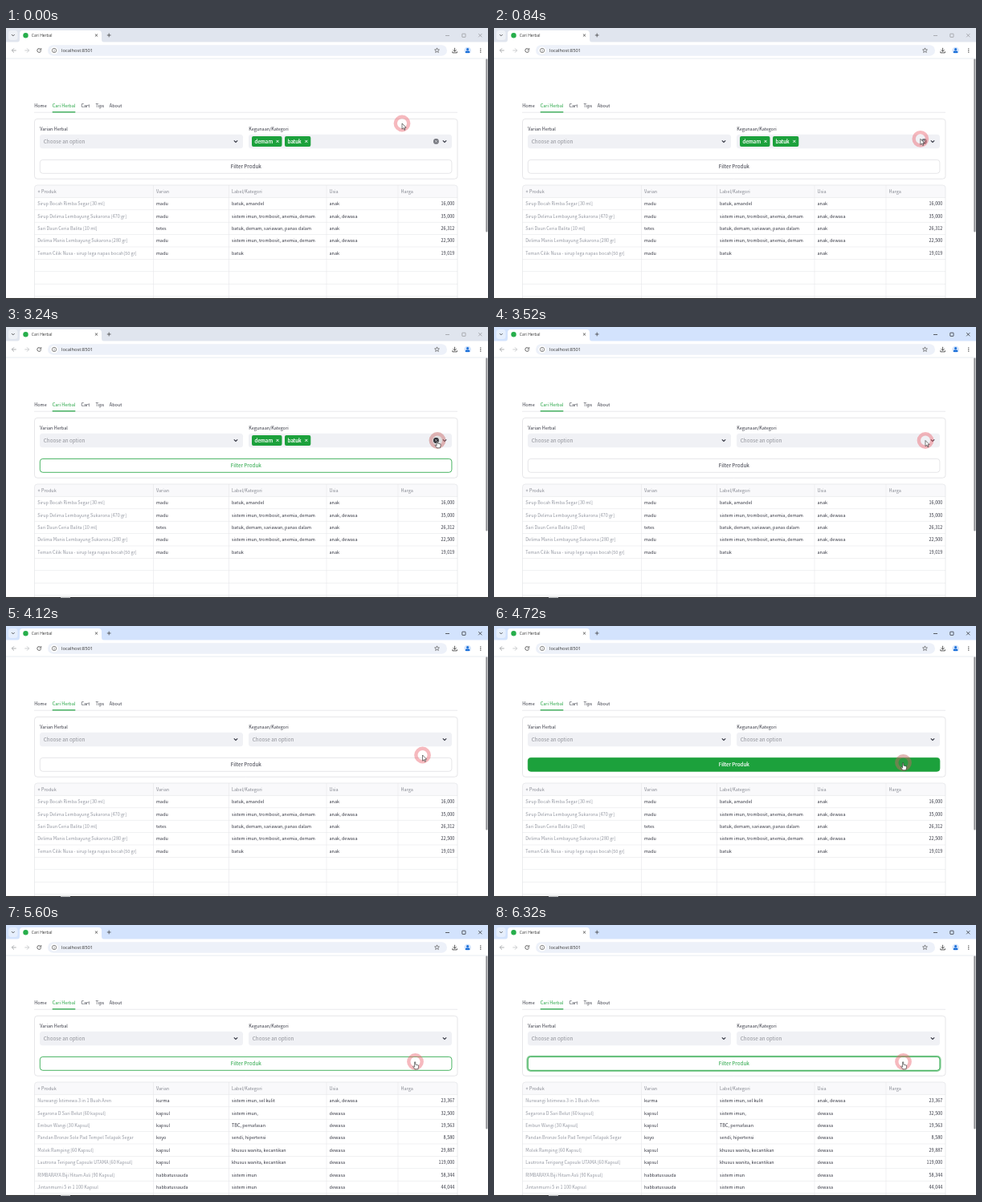
These frames come from a looping animation (600 by 338 pixels, 6.36 s). An HTML page with a canvas:

```html
<!DOCTYPE html>
<html lang="id">
<head>
<meta charset="utf-8">
<title>Cari Herbal</title>
<style>
html, body { margin: 0; width: 100%; height: 100%; overflow: hidden; background: #fff; }
canvas { display: block; width: 600px; height: 338px; }
</style>
</head>
<body>
<canvas id="stage"></canvas>
<script>
const LOOP = 6360;
const canvas = document.getElementById('stage');
const ctx = canvas.getContext('2d');
const dpr = window.devicePixelRatio || 1;
canvas.width = 600 * dpr;
canvas.height = 338 * dpr;

const SANS = '"Noto Sans CJK JP", "Noto Sans CJK SC", "Noto Sans CJK", "Noto Sans", sans-serif';
const UI = '"Open Sans", "Noto Sans", sans-serif';
const GREEN = '#1ca13c', INK = '#31333f', MUTED = '#9296a0', LINE = '#e6e7ea', EDGE = '#d6d6d9';
const SMALL = 5.5, LARGE = 6.3;

// Event times in ms
const T = {
  tipOn: 1800, tipOff: 3060, press: 3160, release: 3360, focus: 3280, clear: 3400, blur: 3440,
  press2: 4640, release2: 4900, results: 5560, halo: 5760
};

const COLS = [35.5, 183.5, 277.5, 399, 488, 562];
const BEFORE = [
  ['Sirup Bocah Rimba Segar [30 ml]', 'madu', 'batuk, amandel', 'anak', '16,000'],
  ['Sirup Delima Lembayung Sukarona [470 gr]', 'madu', 'sistem imun, trombosit, anemia, demam', 'anak, dewasa', '35,000'],
  ['Sari Daun Ceria Balita [10 ml]', 'tetes', 'batuk, demam, sariawan, panas dalam', 'anak', '26,312'],
  ['Delima Manis Lembayung Sukarona [280 gr]', 'madu', 'sistem imun, trombosit, anemia, demam', 'anak, dewasa', '22,500'],
  ['Teman Cilik Nusa - sirup lega napas bocah[50 gr]', 'madu', 'batuk', 'anak', '19,019']
];
const AFTER = [
  ['Nurwangi Istimewa 3 in 1 Buah Aren', 'kurma', 'sistem imun, sel kulit', 'anak, dewasa', '23,367'],
  ['Segarona D Sari Belut [60 kapsul]', 'kapsul', 'sistem imun,', 'dewasa', '32,500'],
  ['Embun Wangi [30 Kapsul]', 'kapsul', 'TBC, pernafasan', 'dewasa', '19,563'],
  ['Pandan Bronze Sole Pad Tempel Telapak Segar', 'koyo', 'sendi, hipertensi', 'dewasa', '8,580'],
  ['Molek Ramping [60 Kapsul]', 'kapsul', 'khusus wanita, kecantikan', 'dewasa', '29,887'],
  ['Lautrona Teripang Capsule UTAMA [60 Kapsul]', 'kapsul', 'khusus wanita, kecantikan', 'dewasa', '119,000'],
  ['RIMBARAYA Biji Hitam Asli [90 Kapsul]', 'habbatussauda', 'sistem imun', 'dewasa', '58,344'],
  ['Jintanmurni 5 in 1 100 Kapsul', 'habbatussauda', 'sistem imun', 'dewasa', '44,044']
];

// Text is laid out at ten times its size so that widths are not rounded.
function text(str, x, y, size, color, { align = 'left', font = SANS, heavy = 0 } = {}) {
  ctx.save();
  ctx.translate(x, y + size * 0.366);
  ctx.scale(0.1, 0.1);
  ctx.font = `${size * 10}px ${font}`;
  ctx.textAlign = align;
  ctx.fillStyle = ctx.strokeStyle = color;
  ctx.fillText(str, 0, 0);
  if (heavy) {
    ctx.lineWidth = heavy * 10;
    ctx.strokeText(str, 0, 0);
  }
  ctx.restore();
}

function rect(x, y, w, h, fill) {
  ctx.fillStyle = fill;
  ctx.fillRect(x, y, w, h);
}

function box(x, y, w, h, r, fill, stroke, width = 0.6) {
  ctx.beginPath();
  ctx.roundRect(x, y, w, h, r);
  if (fill) { ctx.fillStyle = fill; ctx.fill(); }
  if (stroke) { ctx.strokeStyle = stroke; ctx.lineWidth = width; ctx.stroke(); }
}

function disc(x, y, r, fill) {
  ctx.beginPath();
  ctx.arc(x, y, r, 0, Math.PI * 2);
  ctx.fillStyle = fill;
  ctx.fill();
}

function path(pts, color, width = 0.8) {
  ctx.beginPath();
  pts.forEach(([x, y]) => ctx.lineTo(x, y));
  ctx.strokeStyle = color;
  ctx.lineWidth = width;
  ctx.stroke();
}

function cross(x, y, r, color, width) {
  path([[x - r, y - r], [x + r, y + r]], color, width);
  path([[x - r, y + r], [x + r, y - r]], color, width);
}

function chevron(x, y, r, color, width) {
  path([[x - r, y - r / 2], [x, y + r / 2], [x + r, y - r / 2]], color, width);
}

function circle(x, y, r, color, width, from = 0, to = Math.PI * 2) {
  ctx.beginPath();
  ctx.arc(x, y, r, from, to);
  ctx.strokeStyle = color;
  ctx.lineWidth = width;
  ctx.stroke();
}

function arrowIcon(x, y, dir, color) {
  path([[x - 2.7 * dir, y], [x + 2.7 * dir, y]], color, 0.7);
  path([[x, y - 2.7], [x + 2.7 * dir, y], [x, y + 2.7]], color, 0.7);
}

function star(x, y, r) {
  const pts = [];
  for (let i = 0; i <= 10; i++) {
    const a = -Math.PI / 2 + i * Math.PI / 5, d = i % 2 ? r * 0.45 : r;
    pts.push([x + d * Math.cos(a), y + d * Math.sin(a)]);
  }
  path(pts, '#444', 0.6);
}

function browser(active) {
  rect(0, 0, 600, 18, active ? '#d3e3fd' : '#e0e5ee');
  box(3, 3, 11.5, 12, 3.5, active ? '#e6effd' : '#eef1f6');
  chevron(8.8, 9, 1.8, '#333');
  ctx.fillStyle = '#fff';
  ctx.beginPath();
  ctx.moveTo(13.5, 18);
  ctx.quadraticCurveTo(17, 18, 17, 14);
  ctx.lineTo(17, 7);
  ctx.quadraticCurveTo(17, 3, 21, 3);
  ctx.lineTo(115, 3);
  ctx.quadraticCurveTo(119, 3, 119, 7);
  ctx.lineTo(119, 14);
  ctx.quadraticCurveTo(119, 18, 122.5, 18);
  ctx.fill();
  disc(24.5, 9.2, 3.2, '#27ae4b');
  text('Cari Herbal', 31.8, 9.1, 4.9, '#333', { font: UI });
  cross(112.5, 9.1, 1.6, '#333', 0.7);
  path([[125.8, 9], [130.6, 9]], '#333', 0.7);
  path([[128.2, 6.6], [128.2, 11.4]], '#333', 0.7);

  const ctl = active ? '#222' : '#929499';
  path([[547, 9.5], [552, 9.5]], ctl, 0.7);
  box(567.8, 7.2, 4.2, 4.2, 0.4, null, ctl, 0.7);
  cross(590.3, 9.2, 2.1, ctl, 0.7);

  rect(0, 17.5, 600, 20.5, '#fff');
  arrowIcon(10, 28, -1, '#8d9094');
  arrowIcon(26, 28, 1, '#b8babd');
  circle(41.2, 28, 2.4, '#444', 0.8, 0.2, 5.5);
  path([[43.8, 25], [43.8, 27.3], [41.5, 27.3]], '#444', 0.7);
  box(52, 21.2, 497, 13.6, 6.8, '#edf1f9');
  disc(60, 28, 4.6, '#fff');
  circle(60, 28, 2.7, '#444', 0.6);
  path([[60, 27.6], [60, 29.6]], '#444', 0.6);
  path([[60, 26.4], [60, 27]], '#444', 0.6);
  text('localhost:8501', 69, 28, 5.8, '#333', { font: UI });
  star(536.5, 28, 3.1);
  path([[558.6, 24.8], [558.6, 29.2]], '#333');
  path([[556.6, 27.3], [558.6, 29.3], [560.6, 27.3]], '#333');
  path([[555.8, 29.3], [555.8, 30.9], [561.4, 30.9], [561.4, 29.3]], '#333');
  disc(574.6, 28, 4.3, '#d5e5fc');
  disc(574.6, 26.6, 1.5, '#1a6fd8');
  box(571.8, 28.6, 5.6, 2.4, [1.6, 1.6, 0.4, 0.4], '#1a6fd8');
  for (const y of [25.8, 28, 30.2]) disc(590.8, y, 0.65, '#333');
  rect(0, 37.7, 600, 0.7, '#dfe3ea');
}

function nav() {
  [['Home', 35.2], ['Cari Herbal', 57.7], ['Cart', 93.4], ['Tips', 111.4], ['About', 128.8]]
    .forEach(([s, x], i) => text(s, x, 97, SMALL, i === 1 ? GREEN : INK));
  rect(35, 104.8, 527, 0.8, '#e4e4e8');
  rect(57.7, 104.3, 28.6, 1.2, GREEN);
}

function tag(label, x, w) {
  box(x, 135, w, 13, 2, GREEN);
  text(label, x + 3.6, 141.4, LARGE, '#fff', { heavy: 0.22 });
  cross(x + w - 5.5, 141.4, 1.5, '#fff', 0.9);
}

function form(s) {
  box(35.5, 113.4, 526.5, 74.8, 3.5, null, EDGE);
  text('Varian Herbal', 42.2, 126, SMALL, INK);
  text('Kegunaan/Kategori', 302.3, 126, SMALL, INK);
  for (const x of [42, 302]) {
    box(x, 132.8, 253, 17.4, 3.5, '#f0f1f5');
    chevron(x + 244, 141.4, 2.2, INK, 1.1);
  }
  text('Choose an option', 46.8, 141.4, LARGE, '#8d8f96');
  if (s.tags) {
    tag('demam', 306, 37.5);
    tag('batuk', 347, 32.3);
    disc(535.4, 141.4, 3.4, s.overClear ? '#20222a' : '#75777e');
    cross(535.4, 141.4, 1.3, '#f0f1f5', 0.7);
  } else {
    text('Choose an option', 306.8, 141.4, LARGE, '#8d8f96');
  }

  const lit = s.button !== 'plain', solid = s.button === 'solid';
  if (s.halo) box(41.7, 164, 513.6, 17.6, 3.8, null, 'rgba(28,161,60,.5)', 2.6);
  box(42.3, 164.4, 512.6, 16.9, 3.5, solid ? GREEN : '#fff', lit ? GREEN : EDGE, lit ? 0.8 : 0.6);
  text('Filter Produk', 298.7, 172.8, LARGE, solid ? '#fff' : lit ? GREEN : INK,
    { align: 'center', heavy: solid ? 0.2 : 0 });
}

function table(rows) {
  const top = 196, step = 15.4;
  ctx.save();
  ctx.beginPath();
  ctx.roundRect(35.5, top, 526.5, 160, 3.5);
  ctx.clip();
  rect(35, top, 528, step, '#f9f9fb');
  for (let i = 1; i < 10; i++) rect(35, top + i * step - 0.3, 528, 0.6, LINE);
  for (const x of COLS.slice(1, 5)) rect(x - 0.3, top, 0.6, 150, LINE);
  ctx.restore();
  box(35.5, top, 526.5, 160, 3.5, null, '#dedfe3');

  const head = '#83868f';
  path([[39.7, 203.9], [42.3, 203.9]], head, 0.5);
  path([[41, 202.6], [41, 205.4]], head, 0.5);
  ['Produk', 'Varian', 'Label/Kategori', 'Usia', 'Harga'].forEach((s, i) =>
    text(s, i ? COLS[i] + 3.5 : 44, 204, SMALL, head));
  rows.forEach((row, r) => row.forEach((s, c) => {
    const y = top + (r + 1.5) * step + 0.1;
    if (c === 4) text(s, 558.3, y, SMALL, INK, { align: 'right' });
    else text(s, COLS[c] + (c ? 3.5 : 3.8), y, SMALL, c ? INK : MUTED);
  }));
}

function shape(pts, x, y) {
  ctx.beginPath();
  pts.forEach(([px, py]) => ctx.lineTo(x + px, y + py));
  ctx.closePath();
  ctx.fillStyle = '#fff';
  ctx.fill();
  ctx.strokeStyle = '#222';
  ctx.lineWidth = 0.6;
  ctx.stroke();
}

const ARROW = [[0, 0], [0, 7.2], [1.7, 5.7], [2.9, 8.3], [4, 7.8], [2.9, 5.3], [5.1, 5.2]];
const HAND = [[-0.9, 0.4], [0.2, 0.4], [0.4, 3.6], [3.8, 4.4], [4.1, 6], [3.4, 9.3],
  [-0.6, 9.3], [-2.8, 6.2], [-2.2, 5.4], [-0.9, 6.5]];

function pointer(s) {
  if (s.pressed) disc(s.x, s.y, 10.4, 'rgba(120,110,100,.14)');
  circle(s.x, s.y, 8.2, s.pressed ? 'rgba(215,100,100,.38)' : 'rgba(236,100,110,.45)', 4.4);
  shape(s.hand ? HAND : ARROW, s.x, s.y);
}

function glide(t, from, to) {
  const u = Math.min(1, Math.max(0, (t - from) / (to - from)));
  return u * u * (3 - 2 * u);
}

const between = (t, a, b) => t >= a && t < b;

function stateAt(t) {
  const a = glide(t, 0, 1100), b = glide(t, 3640, 4420);
  const x = 493 + 44 * a - 27.5 * b;
  const y = 119 + 22.5 * a + 29 * b;
  const tags = t < T.clear;
  const overClear = tags && Math.hypot(x - 535.4, y - 141.4) < 4;
  const overButton = y > 164;
  let button = 'plain';
  if (between(t, T.press2, T.release2)) button = 'solid';
  else if (overButton || between(t, T.press, T.blur)) button = 'outline';
  return {
    x, y, tags, overClear, button,
    hand: overClear || overButton,
    pressed: between(t, T.press, T.release) || between(t, T.press2, T.release2),
    tip: between(t, T.tipOn, T.tipOff),
    halo: t >= T.halo
  };
}

function draw(t) {
  const s = stateAt(t);
  ctx.setTransform(dpr, 0, 0, dpr, 0, 0);
  rect(0, 0, 600, 338, '#fff');
  browser(t >= T.focus);
  nav();
  form(s);
  table(t < T.results ? BEFORE : AFTER);
  box(597.3, 38.5, 2.2, 216, 1, '#8f9195');
  rect(0, 336.9, 600, 1.1, '#1f2022');
  if (t >= T.press) rect(68, 336.9, 12, 1.1, '#a9abad');
  pointer(s);
  if (s.tip) {
    box(541.5, 148.4, 25, 9.8, 0, '#fff', '#666', 0.6);
    text('Clear all', 544.3, 153.3, 5, '#444', { font: UI });
  }
}

const start = performance.now();
function tick() {
  draw((performance.now() - start) % LOOP);
  requestAnimationFrame(tick);
}
tick();
</script>
</body>
</html>
```
